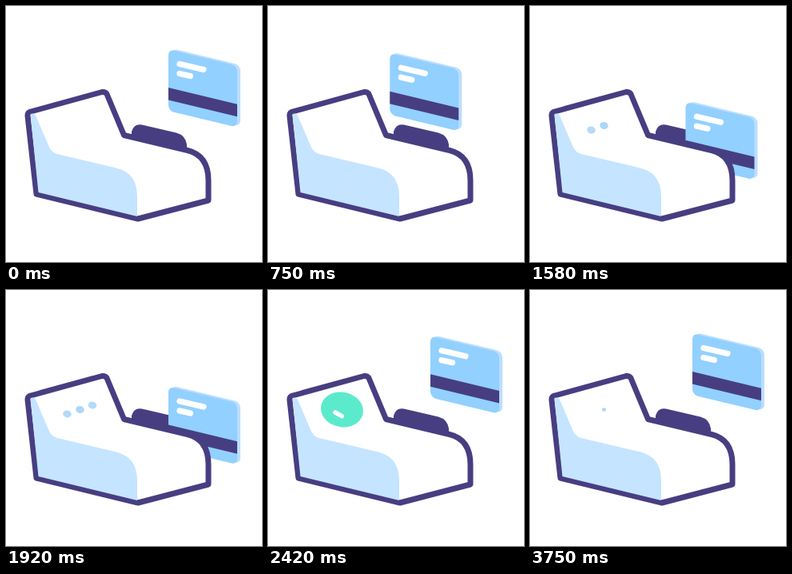
An HTML page for the animation above (3830 ms loop, 320x320 px).

```html
<!DOCTYPE html>
<html lang="en">
<head>
<meta charset="utf-8">
<title>Card payment</title>
<style>
  html, body { margin: 0; height: 100%; overflow: hidden; background: #fff; }
  svg { display: block; width: 100%; height: 100%; }
  .line { fill: none; stroke: #fff; stroke-linecap: round; stroke-linejoin: round; }
</style>
</head>
<body>
<svg viewBox="0 0 320 320">
  <path fill="#473e82" d="M157 166V157Q160 146.500 170 148.500L213 158.500Q224 161.500 226 173V184Z"/>

  <g id="card">
    <g transform="translate(203 55) skewY(13.500)">
      <rect x="4" y="-3" width="86" height="77" rx="7" fill="#bbdeff"/>
      <rect y="-1" width="86" height="77" rx="7" fill="#92d0ff"/>
      <path fill="#473e82" d="M0 47H86V62.500H0Z"/>
    </g>
    <path class="line" stroke-width="7.200" d="M217 72.500L247 79.500M217 84.500L230.500 87.500"/>
  </g>

  <path fill="#fff" stroke="#473e82" stroke-width="7" stroke-linejoin="round"
    d="M31 132L120 107.500Q124 107 126 110L147.500 161.500L227 180.500Q253 187 253 218V243L165 266L38 235L27 137Q27 133 31 132Z"/>
  <path fill="#c5e4ff" d="M30.500 135Q36 133 38 139L54 176.500Q57 183 64 185L138 202.500Q164 209 164 238V263L40.500 233Z"/>

  <g fill="#b4dafa">
    <circle class="dot" transform="matrix(24.5 -6.7 10 21 76.500 155)"/>
    <circle class="dot" transform="matrix(24.5 -6.7 10 21 92.500 149.500)"/>
    <circle class="dot" transform="matrix(24.5 -6.7 10 21 108 144)"/>
  </g>
  <path id="check" class="line" stroke-width="5.500" pathLength="1" d="M84 153L93 158L100.500 141.500"/>
</svg>

<script>
const LOOP = 3830, FPS = 12;
const card = document.getElementById('card');
const check = document.getElementById('check');
const [left, middle, right] = document.querySelectorAll('.dot');

// Smooth 0..1 progress between two times
const ease = (t, from, to) => {
  const u = Math.min(1, Math.max(0, (t - from) / (to - from)));
  return u * u * (3 - 2 * u);
};

const mix = (a, b, p) => `rgb(${a.map((v, i) => Math.round(v + (b[i] - v) * p))})`;

function draw(t) {
  const slide = ease(t, 0, 430) - ease(t, 1125, 1745);
  const drop = ease(t, 583, 1125) - ease(t, 1872, 2500);
  card.setAttribute('transform', `translate(${-50.7 * slide} ${-10.5 * slide + 67.5 * drop})`);

  const grow = ease(t, 2000, 2350) - ease(t, 3150, 3600);
  const small = ease(t, 1420, 1585) - ease(t, 3660, 3840);
  const outer = t < 2350 ? 0.2 : 0;
  left.setAttribute('r', outer * ease(t, 1260, 1430));
  middle.setAttribute('r', 0.2 * small + 0.8 * grow);
  right.setAttribute('r', outer * ease(t, 1580, 1750));
  middle.setAttribute('fill', mix([170, 215, 250], [92, 234, 204], Math.min(1, grow * 2)));

  const drawn = ease(t, 2300, 2600) - ease(t, 3120, 3330);
  check.style.strokeDasharray = `${drawn} 2`;
  check.style.visibility = drawn > 0.01 ? 'visible' : 'hidden';
}

function tick() {
  const step = Math.floor((performance.now() % LOOP + 4) * FPS / 1000);
  draw(step * 1000 / FPS);
  requestAnimationFrame(tick);
}
tick();
</script>
</body>
</html>
```
